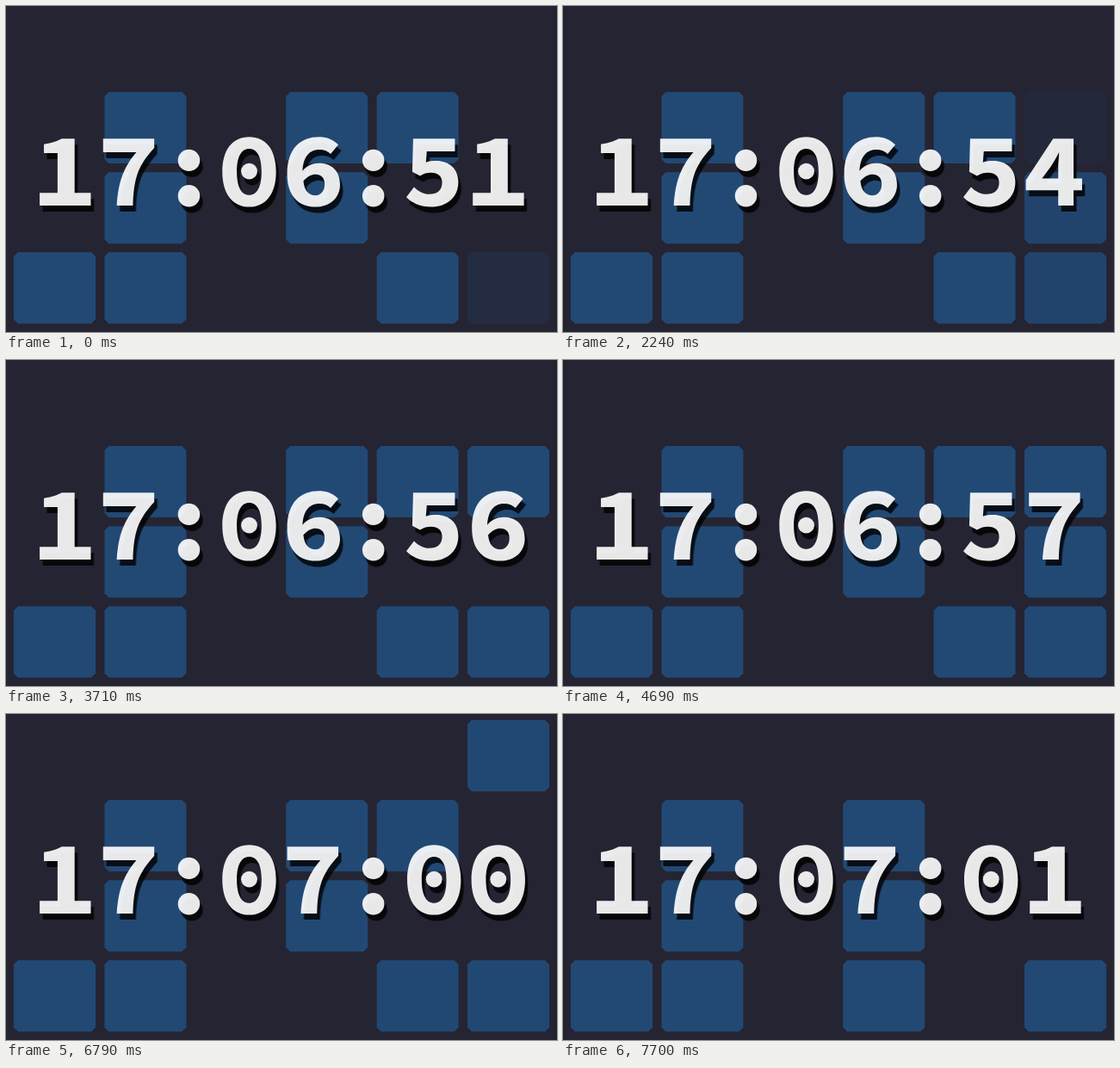
Write an HTML page that moves like this. It is 640x379 px and loops after 8000 ms.

```html
<!DOCTYPE html>
<html lang="en">
<head>
<meta charset="utf-8">
<title>Binary clock</title>
<style>
html, body { margin: 0; width: 100%; height: 100%; overflow: hidden; background: #252433; }
svg { display: block; width: 100%; height: 100%; }
</style>
</head>
<body>
<svg id="stage" role="img" viewBox="0 0 640 379" preserveAspectRatio="none">
  <defs>
    <g id="g0">
      <path fill-rule="evenodd" d="M31.500 0C51 0 63 15 63 41S51 82.500 31.500 82.500 0 67 0 41 12 0 31.500 0ZM31.500 14C22 14 17 24 17 41S22 68.500 31.500 68.500 46 58 46 41 41 14 31.500 14Z"/>
      <circle cx="31.500" cy="40.500" r="9.500"/>
    </g>
    <path id="g1" d="M5 8.500C15 7 20 5 26 2H41V66H60V81H0V66H21V19H5Z"/>
    <path id="g2" d="M0 10C9 3 17 0 28 0C46 0 57 9 57 24C57 38 45 51 29 67C34 66 39 66 43 66H61V81H1V71C24 49 37 36 37 26C37 19 33 15 25 15C19 15 14 18 9 23Z"/>
    <path id="g3" d="M3 9C11 3 19 0 29 0C47 0 58 8 58 21C58 30 53 36 44 39C55 42 61 49 61 59C61 74 47 82.500 29 82.500C16 82.500 7 78 0 71L9 59C15 65 21 67.500 28 67.500C37 67.500 42 64 42 57C42 49 36 46 19 46V33C34 33 39 29 39 23C39 18 35 15 28 15C22 15 17 17 12 21Z"/>
    <path id="g4" fill-rule="evenodd" d="M32 2H56V49H66V63H56V81H38V63H0V51ZM38 49V34C38 29 39 23 39 18C36 24 33 29 30 34L19 49Z"/>
    <path id="g5" d="M8 2H57V17H24L23 30C27 28 31 28 35 28C50 28 61 37 61 53C61 72 47 82.500 29 82.500C16 82.500 7 78 0 71L9 59C14 64 20 67.500 27 67.500C36 67.500 42 63 42 54C42 46 37 42 29 42C24 42 21 43 16 46L7 41Z"/>
    <path id="g6" fill-rule="evenodd" d="M60 9C53 2.500 46 0 37 0C16 0 0 13 0 44C0 70 14 82.500 33 82.500C50 82.500 62 72 62 56C62 39 51 31 37 31C30 31 23 34 18 40C19 22 27 15 38 15C43 15 48 17 51 20ZM19 52C24 46 29 44 33 44C40 44 44 48 44 56C44 64 39 69 33 69C26 69 20 64 19 52Z"/>
    <path id="g7" d="M0 2H60V13C41 34 36 48 35 81H16C18 52 24 36 39 18H0Z"/>
    <path id="g8" fill-rule="evenodd" d="M31 0C48 0 59 8 59 21C59 29 54 35 46 39C57 44 63 50 63 60C63 74 50 82.500 31 82.500S0 74 0 61C0 51 6 45 16 40C8 35 3 29 3 21C3 8 15 0 31 0ZM37 34C42 30 43 26 43 22C43 17 38 13 31 13S20 17 20 22C20 28 27 31 37 34ZM25 46C19 50 17 54 17 59C17 65 23 69 32 69C40 69 45 66 45 60C45 53 36 50 25 46Z"/>
    <path id="g9" fill-rule="evenodd" d="M2 74.500C9 80.500 16 82.500 25 82.500C46 82.500 62 69.500 62 38.500C62 12.500 48 0 29 0C12 0 0 10.500 0 26.500C0 43.500 11 51.500 25 51.500C32 51.500 39 48.500 44 42.500C43 60.500 35 67.500 24 67.500C19 67.500 14 65.500 11 62.500ZM43 30.500C38 36.500 33 38.500 29 38.500C22 38.500 18 34.500 18 26.500C18 18.500 23 13.500 29 13.500C36 13.500 42 18.500 43 30.500Z"/>
    <g id="colon"><circle cx="13" cy="27.500" r="12.900"/><circle cx="13" cy="69.500" r="12.900"/></g>
  </defs>
  <g id="tiles" fill="#224974"></g>
  <g id="shadow" transform="translate(3.500 7)" fill="#000" opacity=".8"></g>
  <g id="face" fill="#fff" opacity=".91"></g>
</svg>
<script>
const NS = "http://www.w3.org/2000/svg";
const LOOP = 8000, FADE = 150, CUT = 5;
const START = 17 * 3600 + 6 * 60 + 50;
// Each second: when the digits change, and when the tiles start to fade.
const ticks = [
  [-70, -45], [700, 770], [1470, 1460], [2240, 2207], [2940, 3000], [3710, 3770],
  [4480, 4540], [5320, 5310], [6090, 6080], [6790, 6785], [7560, 7550]
];
const slots = [37.5, 112.2, 251.3, 326, 466, 540.6];
const bearing = [0, 1.6, 0.5, 0, -3, -1, 0.6, 0.6, 0, 0.5];

const byId = id => document.getElementById(id);

function add(parent, name, attrs) {
  const el = document.createElementNS(NS, name);
  for (const key in attrs) el.setAttribute(key, attrs[key]);
  return parent.appendChild(el);
}

const place = x => `translate(${x} 152.3) scale(.99 .985)`;

const glyphs = ["shadow", "face"].map(id => {
  for (const x of [199.6, 413.8]) add(byId(id), "use", { href: "#colon", transform: place(x) });
  return slots.map(() => add(byId(id), "use", {}));
});

const tiles = slots.map((_, col) => [0, 1, 2, 3].map(row => {
  const x = 9 + col * 105.4, y = 7 + row * 93.1;
  const w = 95 - 2 * CUT, h = 83 - 2 * CUT;
  return add(byId("tiles"), "path", {
    d: `M${x + CUT} ${y}h${w}l${CUT} ${CUT}v${h}l${-CUT} ${CUT}h${-w}l${-CUT} ${-CUT}v${-h}z`
  });
}));

function digitsAt(sec) {
  const pair = n => [Math.floor(n / 10), n % 10];
  return [Math.floor(sec / 3600), Math.floor(sec / 60) % 60, sec % 60].flatMap(pair);
}

function ease(p) {
  p = Math.max(0, Math.min(1, p));
  return p * p * (3 - 2 * p);
}

const bit = (digit, row) => digit >> (3 - row) & 1;

function last(t, part) {
  let i = 0;
  while (i + 1 < ticks.length && t >= ticks[i + 1][part]) i++;
  return i;
}

function draw(t) {
  const shown = digitsAt(START + last(t, 0) + 1);
  shown.forEach((digit, col) => {
    for (const set of glyphs) {
      set[col].setAttribute("href", "#g" + digit);
      set[col].setAttribute("transform", place(slots[col] + bearing[digit]));
    }
  });
  byId("stage").setAttribute("aria-label", shown.join("").replace(/(..)(..)(..)/, "$1:$2:$3"));

  const i = last(t, 1), k = ease((t - ticks[i][1]) / FADE);
  const from = digitsAt(START + i), to = digitsAt(START + i + 1);
  tiles.forEach((column, col) => column.forEach((tile, row) => {
    const a = bit(from[col], row), b = bit(to[col], row);
    tile.setAttribute("opacity", a + (b - a) * k);
  }));
}

function frame(time) {
  draw(time % LOOP);
  requestAnimationFrame(frame);
}
draw(0);
requestAnimationFrame(frame);
</script>
</body>
</html>
```
